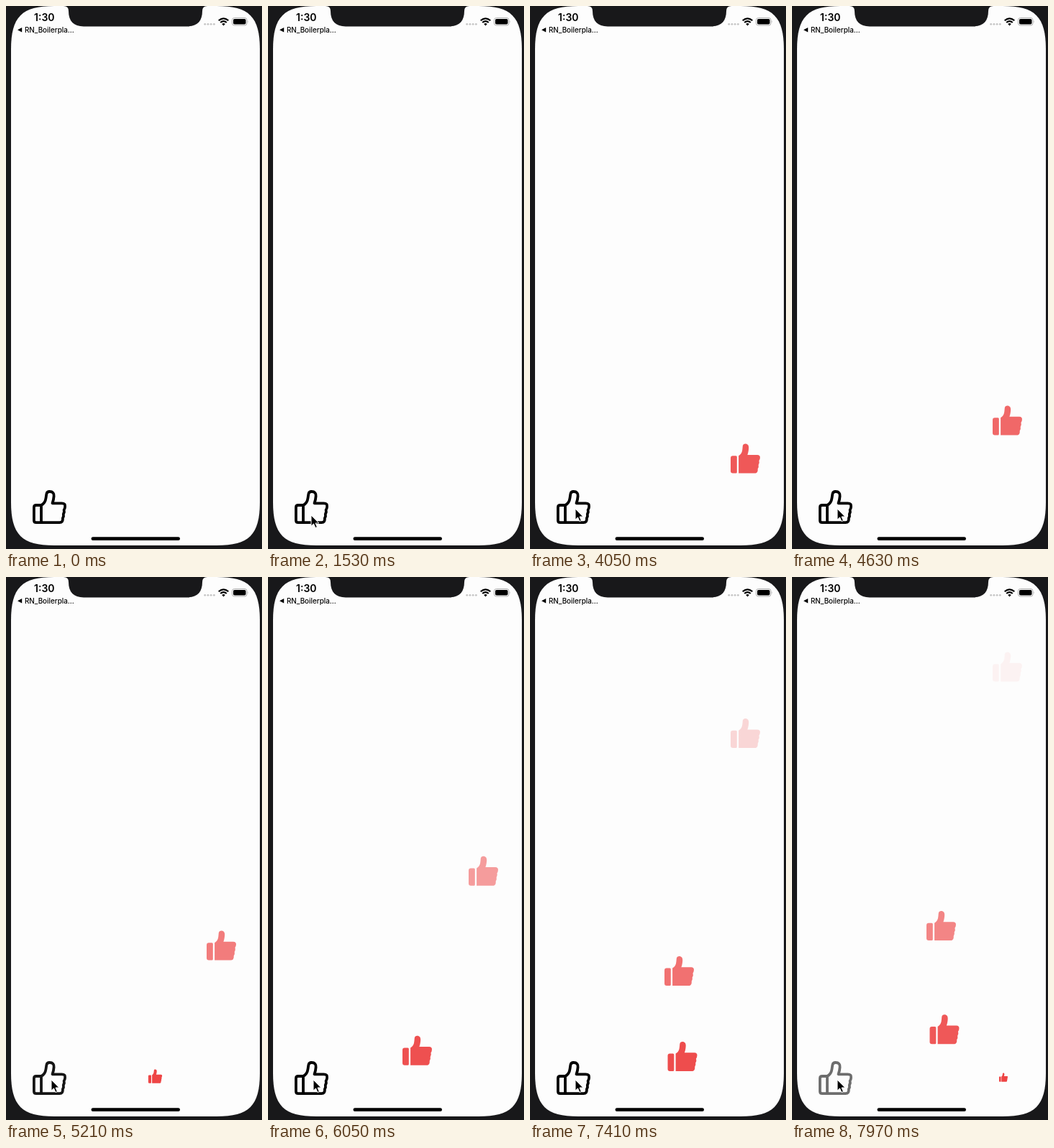
An HTML page that plays this animation: 356 by 756 pixels, repeating every 7990 ms.

```html
<!DOCTYPE html>
<html lang="en">
<head>
<meta charset="utf-8">
<title>Floating likes</title>
<style>
  html, body { margin: 0; width: 100%; height: 100%; overflow: hidden; background: #18181a; }
  svg { display: block; width: 356px; height: 756px; }
  text { font-family: Inter, "Liberation Sans", sans-serif; }
  .like { fill: #ee4444; }
  .line { fill: none; stroke: #000; stroke-linecap: round; stroke-linejoin: round; }
</style>
</head>
<body>
<svg viewBox="0 0 356 756">
  <defs>
    <g id="thumb">
      <path d="M-17.5-3.8H-13.2Q-11.7-3.8-11.7-2.3V19Q-11.7 20.5-13.2 20.5H-17.5Q-20.5 20.5-20.5 17.5V-.8Q-20.5-3.8-17.5-3.8Z"/>
      <path d="M-9.4-3.8C-6-5.5-4.4-9-4.1-13L-3.7-17.5C-3.4-19.6-2-20.5 0-20.5C3.2-20.5 4.8-18.2 4.7-15C4.6-11.5 4-8.3 2.9-5.2H16.5C19.4-5.2 20.9-3.5 20.4-.8Q20.3 1.5 19 3Q20 6 18.2 9Q19 12 17.2 14.5C17.6 18.5 16 20.5 13 20.5H-9.4Z"/>
    </g>
  </defs>

  <path d="M7 60C7 15 22 0 67 0H293C338 0 353 15 353 60V691C353 736 338 751 293 751H67C22 751 7 736 7 691Z" fill="#fdfdfd"/>
  <path d="M80 0Q87 0 87 7C87 21 94 28.4 108 28.4H252C266 28.4 273 21 273 7Q273 0 280 0Z" fill="#18181a"/>

  <text x="39" y="21" font-size="14" font-weight="600">1:30</text>
  <path d="M16 33.2 22.2 30V36.4Z"/>
  <text x="26" y="36.8" font-size="9.8" font-weight="500">RN_Boilerpla...</text>
  <g fill="#c4c4c4">
    <circle cx="276.7" cy="25.3" r="1.4"/><circle cx="280.9" cy="25.3" r="1.4"/>
    <circle cx="285.1" cy="25.3" r="1.4"/><circle cx="289.3" cy="25.3" r="1.4"/>
  </g>
  <g class="line" stroke-width="2.2" style="stroke-linecap:butt">
    <path d="M295.7 20.3Q302.5 14.3 309.3 20.3"/>
    <path d="M298.2 23Q302.5 19.2 306.8 23"/>
  </g>
  <path d="M300.2 25Q302.5 23.2 304.8 25L302.5 27.4Z"/>
  <rect x="314.5" y="16.5" width="20.5" height="10.5" rx="3" fill="none" stroke="#b0b0b0"/>
  <rect x="316" y="18" width="17.5" height="7.5" rx="1.8"/>
  <path d="M336.2 20V23.6Q337.6 21.8 336.2 20Z" fill="#b0b0b0"/>
  <rect x="118.5" y="739.3" width="123.5" height="4.8" rx="2.4"/>

  <g id="likes"></g>
  <g id="button" class="line" stroke-width="3.8">
    <path d="M49 695C53 693 55 689 55.5 685L56.3 679.5Q57 676 60.5 676C65 676 67 678.5 66.6 682.5Q66.2 688 64.5 692.3H77.5Q83 692.3 82.1 697Q82 700 80.6 701.5Q81.6 704.5 79.8 707.5Q80.6 710.5 78.9 713C79.3 717.2 77.8 719.2 74.5 719.2H42Q38.9 719.2 38.9 716.2V698Q38.9 695 42 695ZV719"/>
  </g>
  <path id="cursor" d="M0 0V15.2L3.5 11.9 5.9 17.5 8.4 16.4 6 11H10.8Z" fill="#000" stroke="#fff" stroke-width="1"/>
</svg>
<script>
const LOOP = 7990, RISE_MS = 6200, RISE = 696, FADE_RISE = 605, BASE_Y = 699;
const taps = [[2450, 299.5], [4920, 207.5], [6365, 212], [7700, 294]];
const cursorPath = [[1150, 66, 762], [1530, 60, 709], [1800, 59, 700], [3200, 59, 700], [3600, 63, 700]];

const byId = id => document.getElementById(id);
const button = byId('button'), cursor = byId('cursor');
const clamp = v => Math.min(1, Math.max(0, v));
const easeInOut = u => u < .5 ? 2 * u * u : 1 - 2 * (1 - u) ** 2;

const likes = taps.map(([start, x]) => {
  const node = document.createElementNS('http://www.w3.org/2000/svg', 'use');
  node.setAttribute('href', '#thumb');
  node.setAttribute('class', 'like');
  byId('likes').append(node);
  return { node, start, x };
});

// cubic-bezier(.42, 0, 1, 1)
function easeIn(x) {
  let low = 0, high = 1;
  for (let i = 0; i < 24; i++) {
    const s = (low + high) / 2;
    const bx = 1.26 * s * (1 - s) ** 2 + 3 * s * s * (1 - s) + s ** 3;
    if (bx < x) low = s; else high = s;
  }
  return 3 * low ** 2 - 2 * low ** 3;
}

function track(points, t) {
  const i = points.findIndex(p => p[0] > t);
  if (i === 0) return points[0].slice(1);
  if (i < 0) return points.at(-1).slice(1);
  const a = points[i - 1], b = points[i];
  const u = (t - a[0]) / (b[0] - a[0]);
  return [a[1] + (b[1] - a[1]) * u, a[2] + (b[2] - a[2]) * u];
}

// Playback is uneven: three evenly spaced poses are held for 20, 20 and 100 ms.
function poseTime(t) {
  const shifted = t + 10, rest = shifted % 140;
  const step = rest < 20 ? 0 : rest < 40 ? 1 : 2;
  return shifted - rest - 10 + step * 140 / 3;
}

// Grows with height to an overshoot, then settles at full size.
function popScale(height) {
  return height < 10.3 ? height * .1235 : 1 + .27 * (1 - clamp((height - 10.3) / 10.3));
}

function pressOpacity(age) {
  const down = easeInOut(clamp((age + 10) / 150));
  const up = easeInOut(clamp((age - 150) / 250));
  return 1 - .8 * (down - up);
}

function draw(now) {
  const t = poseTime(now % LOOP);
  let opacity = 1;
  for (const { node, start, x } of likes) {
    const age = t - start, height = RISE * easeIn(clamp(age / RISE_MS));
    node.setAttribute('visibility', age > 0 ? 'visible' : 'hidden');
    node.setAttribute('opacity', clamp(1 - height / FADE_RISE));
    node.setAttribute('transform', `translate(${x} ${BASE_Y - height}) scale(${popScale(height)})`);
    opacity = Math.min(opacity, pressOpacity(age));
  }
  button.setAttribute('opacity', opacity);
  cursor.setAttribute('transform', `translate(${track(cursorPath, t)})`);
}

const begin = performance.now();
function frame() {
  draw(performance.now() - begin);
  requestAnimationFrame(frame);
}
frame();
</script>
</body>
</html>
```
